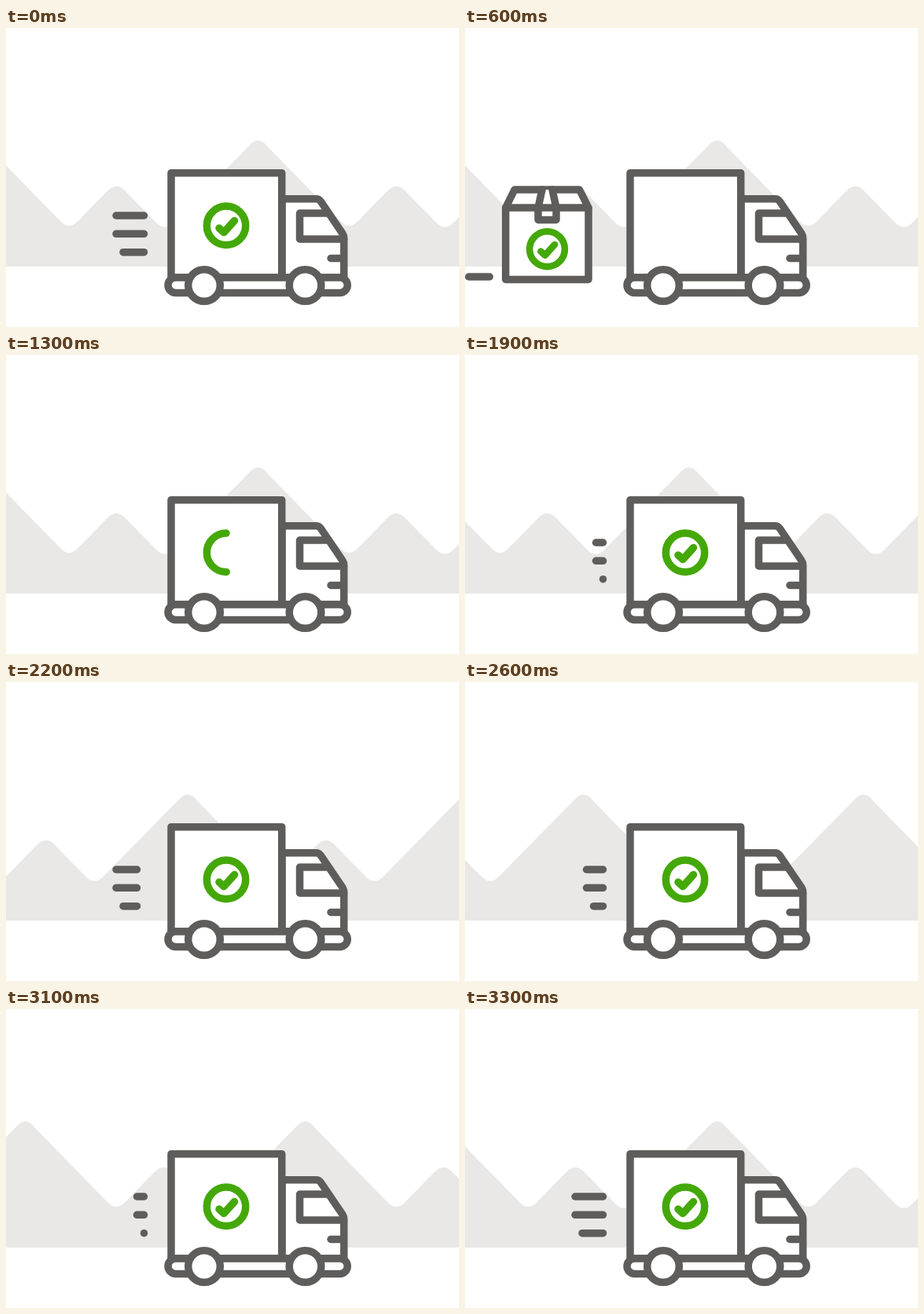
Animation, 576 px wide and 381 px high, one loop 3.8 s. Source, as an HTML page without scripts:

```html
<!DOCTYPE html>
<html lang="en">
<head>
<meta charset="utf-8">
<title>Delivery truck</title>
<style>
  html, body { margin: 0; height: 100%; overflow: hidden; background: #fff; }
  svg { display: block; width: 576px; height: 381px; }

  .ink { fill: #fff; stroke: #5e5d5b; stroke-width: 9.5; }
  .green { fill: none; stroke: #44a808; stroke-width: 9.5; }
  .ink, .green { stroke-linecap: round; stroke-linejoin: round; }
  .open { fill: none; }

  #hills, #parcel, .ring, .tick, .speed { animation: 3.8s step-end infinite; }
  #hills { fill: #e9e8e6; animation-name: scroll; }
  #parcel { animation-name: load; }
  .ring { animation-name: ring; }
  .tick { animation-name: tick; }
  .speed { --cut: 0px; animation-name: whoosh; }
  .short { --cut: 9px; }

  /* One picture step of 100 ms is 2.63% of the loop. */
  @keyframes scroll {
    0% { transform: translateX(0); }
    44.73% { transform: translateX(0); animation-timing-function: steps(5); }
    57.89% { transform: translateX(-89.5px); animation-timing-function: steps(4); }
    68.42% { transform: translateX(-170px); animation-timing-function: steps(3); }
    76.31% { transform: translateX(-240px); animation-timing-function: steps(2); }
    81.57% { transform: translateX(-296px); animation-timing-function: steps(2); }
    86.84%, 100% { transform: translateX(-356px); }
  }
  @keyframes load {
    0%, 28.94%, 100% { transform: translateX(-200px); }
    2.63% { transform: translateX(-43px); }
    13.15% { transform: translateX(-43px); animation-timing-function: steps(5); }
    26.31% { transform: translateX(172px); }
  }
  @keyframes ring {
    0%, 39.47%, 100% { visibility: visible; stroke-dasharray: 4 9; }
    2.63% { visibility: hidden; stroke-dasharray: .01 9; }
    28.94% { visibility: visible; stroke-dasharray: .01 9; animation-timing-function: steps(4); }
  }
  @keyframes tick {
    0%, 44.73%, 100% { visibility: visible; stroke-dasharray: 2 9; }
    2.63% { visibility: hidden; stroke-dasharray: 1 9; }
    42.1% { visibility: visible; stroke-dasharray: 1 9; }
  }
  @keyframes whoosh {
    0%, 55.26%, 71.05%, 86.84%, 100% {
      visibility: visible; stroke-dasharray: calc(36px - var(--cut)) 99px; stroke-dashoffset: 0px;
    }
    2.63%, 47.36%, 63.15%, 78.94% {
      visibility: hidden; stroke-dasharray: 1px 99px; stroke-dashoffset: 0px;
    }
    49.99%, 65.78%, 81.57% {
      visibility: visible; stroke-dasharray: calc(9.01px - var(--cut)) 99px; stroke-dashoffset: 0px;
    }
    52.63%, 68.42%, 84.21% {
      visibility: visible; stroke-dasharray: calc(21px - var(--cut)) 99px; stroke-dashoffset: 0px;
    }
    57.89%, 73.68% {
      visibility: visible; stroke-dasharray: 36px 99px; stroke-dashoffset: -9px;
    }
    60.52%, 76.31% {
      visibility: visible; stroke-dasharray: 36px 99px; stroke-dashoffset: -22px;
    }
  }
</style>
</head>
<body>
<svg viewBox="0 0 576 381">
  <defs>
    <path id="range" d="M70 247q10 10 20.5 0L130 206.5q10.5-9.5 20.5 0L191 248q11 11 22 0L311 148q11-11 22 3.5L426 247h1V304H70Z"/>
    <path id="circle" pathLength="4" d="M280 227.1a24.7 24.7 0 0 0 0 49.4a24.7 24.7 0 0 0 0-49.4"/>
    <path id="check" pathLength="2" d="M271 255l6 5.5L290.5 245.5"/>
  </defs>

  <g id="hills">
    <use href="#range" x="-356"/>
    <use href="#range"/>
    <use href="#range" x="356"/>
    <use href="#range" x="712"/>
  </g>

  <g id="parcel">
    <g class="ink">
      <path d="M4.7 317H31.3"/>
      <path d="M51.7 229L63 206H145.500L157 229V320.500H51.700Z"/>
      <path d="M51.700 229H157"/>
      <path d="M98 206L93 229V244.500H116V229L111 206M93 229H116"/>
    </g>
    <g class="green" transform="translate(104.5 281.700) scale(.907) translate(-280 -251.800)">
      <use href="#circle"/>
      <use href="#check"/>
    </g>
  </g>

  <g class="ink open">
    <path class="speed" d="M175.500 239H140"/>
    <path class="speed" d="M175.500 262.300H140"/>
    <path class="speed short" d="M175.500 285.700H149"/>
  </g>

  <g class="ink">
    <path d="M351 217.700H394Q398 217.700 400 220.700L428 262Q429.700 264.800 429.700 268V318H351Z"/>
    <path d="M409 236H373.500V269H429.500" class="open"/>
    <path d="M413 293.500H429"/>
    <path d="M210 184.700H350.700V318H210Z"/>
    <rect x="206" y="318" width="228.200" height="19.500" rx="9.750"/>
    <circle cx="252" cy="328" r="20.300"/>
    <circle cx="380.500" cy="328" r="20.300"/>
  </g>

  <g class="green">
    <use class="ring" href="#circle"/>
    <use class="tick" href="#check"/>
  </g>
</svg>
</body>
</html>
```
